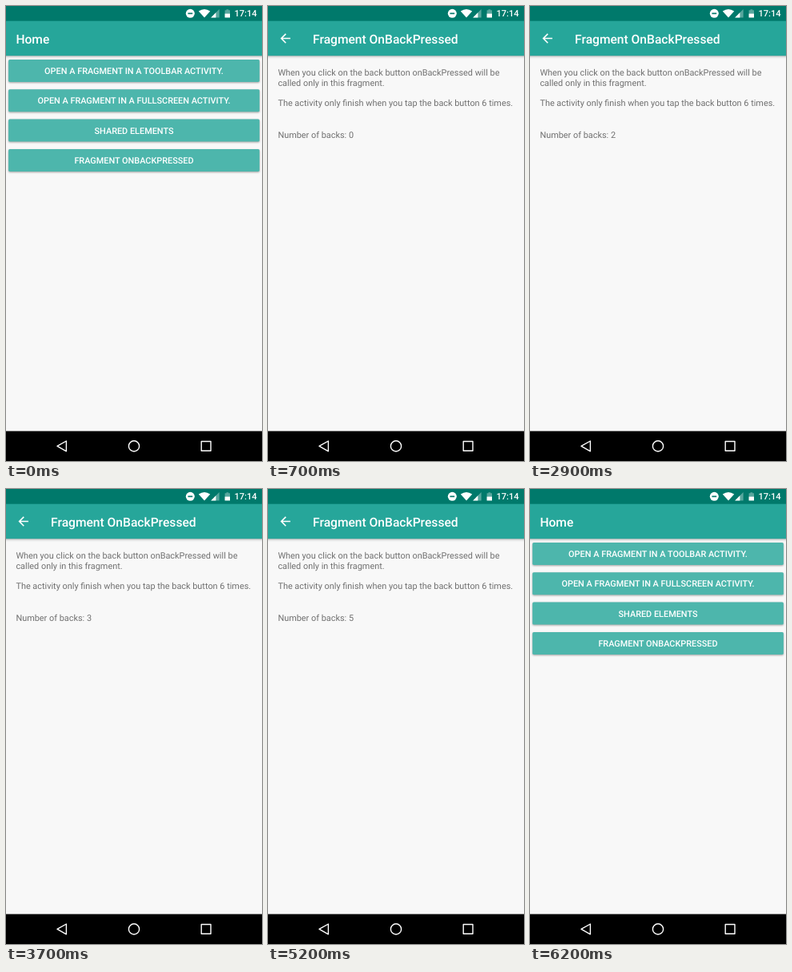
These frames come from a looping animation (320 by 569 pixels, 6300 ms). An HTML page:

```html
<!DOCTYPE html>
<html lang="en">
<head>
<meta charset="utf-8">
<title>Fragment back press</title>
<style>
  html, body { margin: 0; width: 100%; height: 100%; overflow: hidden; background: #000; }
  svg { display: block; width: 100%; height: 100%; }
  text { font-family: Roboto, sans-serif; text-rendering: geometricPrecision; }
  .title { font-size: 15.6px; font-weight: 500; fill: #fff; }
  .label { font-size: 10.9px; font-weight: 500; fill: #fff; text-anchor: middle; }
  .body { font-size: 10.9px; fill: #707070; }
  .button { filter: drop-shadow(0 1px 1px rgba(0, 0, 0, .35)); }
</style>
</head>
<body>
<svg viewBox="0 0 320 569">
  <defs>
    <linearGradient id="shade" x2="0" y2="1">
      <stop offset="0" stop-opacity=".3"/>
      <stop offset=".4" stop-opacity=".1"/>
      <stop offset="1" stop-opacity="0"/>
    </linearGradient>
    <clipPath id="lastButton"><rect x="3.1" y="178.9" width="313.8" height="28" rx="1.6"/></clipPath>
    <g id="frame">
      <rect width="320" height="569"/>
      <rect width="320" height="531.6" fill="#f8f8f8"/>
      <rect y="62" width="320" height="4" fill="url(#shade)"/>
      <rect width="320" height="62.2" fill="#26a69a"/>
      <rect width="320" height="18.7" fill="#00796b"/>
    </g>
  </defs>

  <g id="home">
    <use href="#frame"/>
    <text class="title" x="12.4" y="46.5">Home</text>
    <g id="buttons"></g>
    <circle id="tap" cx="160" cy="193" fill="#fff" clip-path="url(#lastButton)"/>
  </g>
  <rect id="dim" width="320" height="569"/>

  <g id="detail">
    <use href="#frame"/>
    <path transform="translate(12.4 31.2) scale(.778)" fill="#fff"
      d="M20 11H7.83l5.59-5.59L12 4l-8 8 8 8 1.41-1.41L7.83 13H20z"/>
    <text class="title" x="56" y="46.5">Fragment OnBackPressed</text>
    <text class="body" x="12.4" y="86.6">When you click on the back button onBackPressed will be</text>
    <text class="body" x="12.4" y="99.5">called only in this fragment.</text>
    <text class="body" x="12.4" y="125">The activity only finish when you tap the back button 6 times.</text>
    <text class="body" x="12.4" y="164.8" id="count"></text>
    <circle id="upRipple" cx="21.8" cy="40.7" fill="#fff"/>
  </g>

  <g fill="#fff">
    <circle cx="230.3" cy="9.3" r="5.5"/>
    <path d="M227.4 8.5h5.8v1.7h-5.8z" fill="#00796b"/>
    <path d="M240.8 6.6Q248 1.6 255.2 6.6L248 14.6z"/>
    <path d="M266.6 4v10.4H256.2z" opacity=".35"/>
    <path d="M262.4 8.2v6.2H256.2z"/>
    <path d="M273.6 5.2h1.8V4.2h2.8v1h1.8V14.4h-6.4z" opacity=".35"/>
    <path d="M273.6 9.6h6.4v4.8h-6.4z"/>
    <text x="313.6" y="13.2" font-size="11.1" font-weight="500" text-anchor="end">17:14</text>
  </g>

  <rect id="navRipple" y="531.6" height="37.4" fill="#fff"/>
  <g fill="none" stroke="#fff" stroke-width="1.4" stroke-linejoin="round">
    <path d="M64 550.4L75.4 544v12.8z"/>
    <circle cx="160" cy="550.4" r="6.6"/>
    <rect x="244.2" y="544.5" width="11.8" height="11.8"/>
  </g>
</svg>
<script>
const LOOP = 6300, STEP = 100, OPEN = 215, CLOSE = 5897, SLIDE = 569 * .08;
const presses = [
  { at: 1700, steps: 5 },
  { at: 2600, steps: 4 },
  { at: 3300, steps: 5, nav: true },
  { at: 4000, steps: 6, nav: true },
  { at: 4800, steps: 5 },
  { at: 5800, steps: 5 }
];
const labels = [
  'OPEN A FRAGMENT IN A TOOLBAR ACTIVITY.',
  'OPEN A FRAGMENT IN A FULLSCREEN ACTIVITY.',
  'SHARED ELEMENTS',
  'FRAGMENT ONBACKPRESSED'
];

const $ = id => document.getElementById(id);
const set = (id, attrs) => {
  for (const key in attrs) $(id).setAttribute(key, attrs[key]);
};
const ramp = (t, start, length) => Math.min(1, Math.max(0, (t - start) / length));
const smooth = p => p * p * (3 - 2 * p);

$('buttons').innerHTML = labels.map((label, i) => {
  const y = 66.9 + i * 37.34;
  return `<rect class="button" x="3.1" y="${y}" width="313.8" height="28" rx="1.6" fill="#4db6ac"/>
    <text class="label" x="160" y="${y + 18}">${label}</text>`;
}).join('');

function drawWindows(t) {
  const closing = t >= CLOSE;
  const p = closing ? ramp(t, CLOSE, 250) : ramp(t, OPEN, 350);
  const shift = SLIDE * (closing ? p ** 4 : (1 - p) ** 5);
  const alpha = closing
    ? 1 - ramp(t, CLOSE + 100, 150)
    : 1 - (1 - ramp(t, OPEN, 200)) ** 4;
  const dim = closing ? 1 - smooth(p) : smooth(ramp(t, OPEN, 140));
  set('detail', { transform: `translate(0 ${shift})`, opacity: alpha });
  set('dim', { opacity: .3 * dim });
}

function drawPresses(t) {
  const tap = ramp(t, 0, 300);
  set('tap', { r: 170 * tap, opacity: t < 300 ? .15 * tap : 0 });

  const press = presses.find(p => t >= p.at && t < p.at + p.steps * STEP);
  const p = press ? ramp(t + STEP, press.at, press.steps * STEP) : 1;
  const glow = .2 * Math.sin(Math.PI * p);
  const width = 84 * Math.min(1, .6 + p);
  set('upRipple', { r: 14 * Math.sqrt(p), opacity: press && !press.nav ? glow : 0 });
  set('navRipple', { x: 70 - width / 2, width, rx: 18.7, opacity: press && press.nav ? glow : 0 });

  const backs = presses.slice(0, 5).filter(p => t >= p.at + STEP).length;
  $('count').textContent = 'Number of backs: ' + backs;
}

function draw(now) {
  const t = Math.floor((now % LOOP) / STEP) * STEP;
  drawWindows(t);
  drawPresses(t);
}

const start = performance.now();
function tick() {
  draw(performance.now() - start);
  requestAnimationFrame(tick);
}
tick();
</script>
</body>
</html>
```
